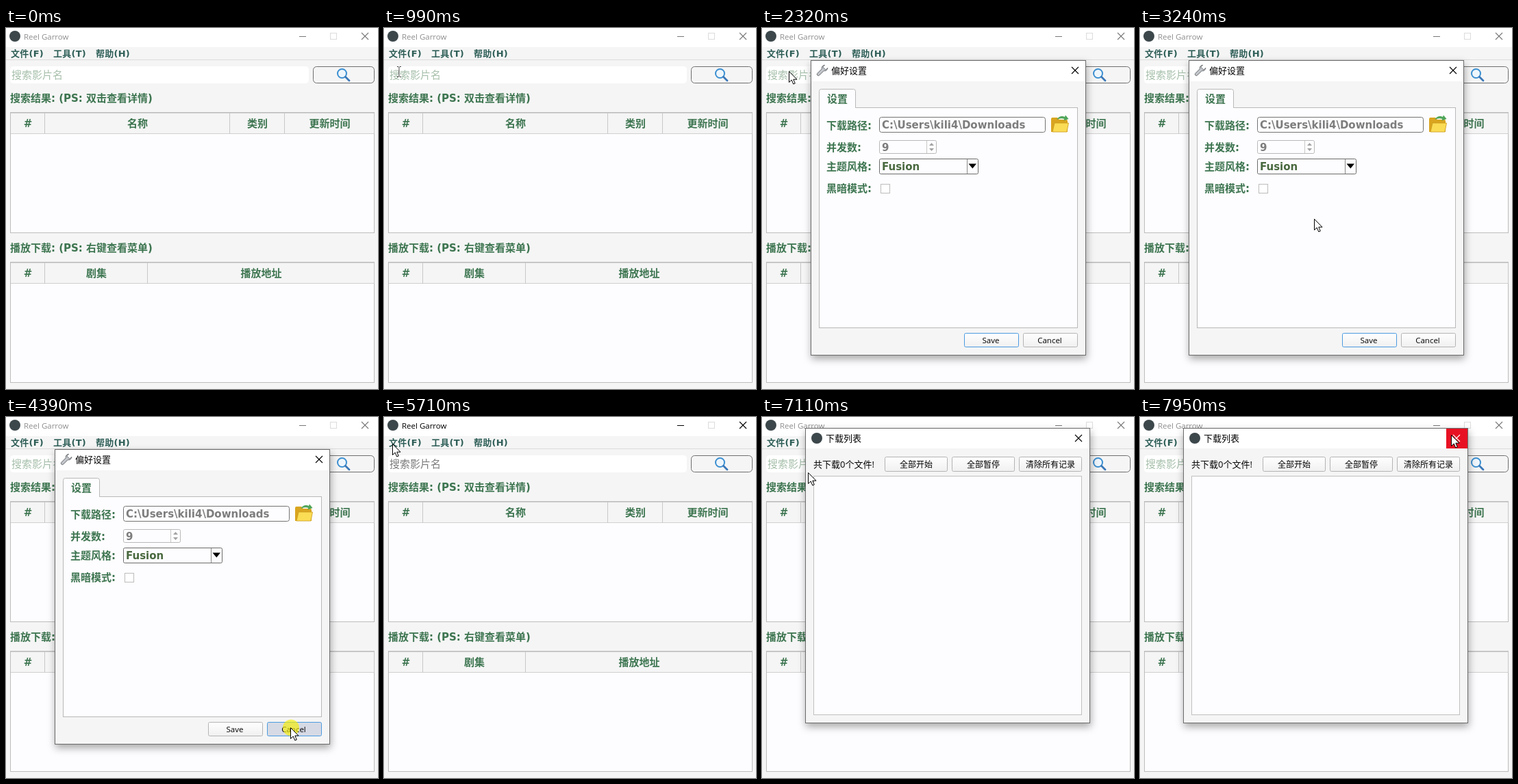
Animation of 543x528 px, one loop 8000 ms. Source, as an HTML page:

```html
<!DOCTYPE html>
<html lang="zh-CN">
<head>
<meta charset="utf-8">
<style>
html, body { margin: 0; width: 100%; height: 100%; overflow: hidden; background: #f5f5f5; }
svg { display: block; width: 543px; height: 528px; }
text { white-space: pre; }
.b { font: bold 15px 'DejaVu Sans', 'Noto Sans CJK SC', 'Noto Sans CJK', sans-serif; fill: #3d7550; }
.m { font-size: 13px; letter-spacing: .25px; fill: #2f5f58; }
.u { font: 12px 'Open Sans', 'Noto Sans CJK SC', 'Noto Sans CJK', sans-serif; fill: #000; }
.p { font-size: 15px; }
.t { font-size: 13px; }
.c { text-anchor: middle; }
</style>
</head>
<body>
<svg id="stage" viewBox="0 0 543 528" xmlns="http://www.w3.org/2000/svg"></svg>
<script>
const PANEL = '#fdfcfe', BG = '#f5f5f5', BLUE = '#2a82da';
const stage = document.getElementById('stage');

// Crisp one pixel outline: x0..x1, y0..y1 are the outer edges
const box = (x0, y0, x1, y1, fill, stroke = 'none', r = 0, extra = '') =>
  `<rect x="${x0 + .5}" y="${y0 + .5}" width="${x1 - x0 - 1}" height="${y1 - y0 - 1}" rx="${r}" fill="${fill}" stroke="${stroke}" ${extra}/>`;
const fill = (x0, y0, x1, y1, color, extra = '') =>
  `<rect x="${x0}" y="${y0}" width="${x1 - x0}" height="${y1 - y0}" fill="${color}" ${extra}/>`;
const text = (x, y, s, cls, extra = '') => `<text x="${x}" y="${y}" class="${cls}" ${extra}>${s}</text>`;
const line = (d, stroke, w = 1, extra = '') => `<path d="${d}" fill="none" stroke="${stroke}" stroke-width="${w}" ${extra}/>`;
const group = (id, body, extra = '') => `<g id="${id}" ${extra}>${body}</g>`;
const cross = (x, y, stroke, extra = '') =>
  line(`M${x - 5} ${y - 5}l10 10m0 -10l-10 10`, stroke, 1.1, extra);
const appIcon = (x, y) => `<circle cx="${x}" cy="${y}" r="8" fill="#3c474b"/>`;

function table(y, cols, labels) {
  let s = box(6, y, 538, y + 177, PANEL, '#bdbdbd') + fill(7, y + 1, 537, y + 32, BG);
  s += line(`M7 ${y + 31.5}H537M7 ${y + 1.5}H537`, '#d0d0d0');
  labels.forEach((label, i) => {
    s += line(`M${cols[i + 1] - .5} ${y + 1}V${y + 32}`, '#c8c8c8');
    s += text((cols[i] + cols[i + 1]) / 2, y + 22, label, 'b c');
  });
  return s;
}

function wrench(x, y) {
  return `<g transform="translate(${x} ${y}) rotate(45)"><path d="M-2 8V-1A4.6 4.6 0 0 1 -3 -8V-4H3V-8A4.6 4.6 0 0 1 2 -1V8A2 2 0 0 1 -2 8Z" fill="#c3c6ca" stroke="#65696e" stroke-width=".9"/></g>`;
}

function filmIcon(x, y) {
  const strip = (dx, dy) => {
    let s = fill(x + dx, y + dy, x + dx + 10, y + dy + 11, '#33383d') + fill(x + dx + 3, y + dy + 1, x + dx + 7, y + dy + 10, '#9ab0bd');
    for (let i = 0; i < 3; i++)
      for (const h of [1, 8]) s += fill(x + dx + h, y + dy + 1 + i * 4, x + dx + h + 1, y + dy + 3 + i * 4, '#eee');
    return s;
  };
  return strip(6, 0) + strip(0, 4);
}

const folderDoc = (x, y) =>
  box(x + 3, y, x + 14, y + 14, '#8d7b60', '#5c5245') + fill(x + 6, y + 2, x + 12, y + 12, '#f3ead2') +
  `<path d="M${x} ${y + 2}l6 2v11l-6 -2z" fill="#e4c98c" stroke="#94774a" stroke-width=".7"/>`;

const folderOpen =
  `<path d="M422 152V133q0 -2 2 -2h7l3 3h10q2 0 2 2v16z" fill="#d9a520"/>
   <path d="M424 152l3 -13h20.500l-2.500 13z" fill="#fbdc55" stroke="#c99a1c" stroke-width=".8"/>
   <path d="M430 134q5 -7 12 -4l1 -2.500l4.500 5.500l-7 2.500l.7 -2.500q-5 -2 -11.200 1z" fill="#4fa55a"/>`;

const button = (x0, y0, x1, y1, label, id = '') =>
  box(x0, y0, x1, y1, 'url(#face)', '#b4b4b4', 2, id && `id="${id}"`) +
  text((x0 + x1) / 2 - (id ? 1 : 0), y1 - 6, label, 'u c', id && 'font-size="11.500" style="font-size:11.500px"');

const windowChrome =
  fill(0, 0, 543, 528, BG) + fill(0, 0, 543, 28, '#fff') + appIcon(13, 12) +
  text(26, 17, 'Reel Garrow', 'u', 'id="title" style="font-size:11.500px"') +
  line('M428 12.500H438', '#000', 1, 'id="min"') + box(473, 7, 483, 17, 'none', '#dcdcdc') +
  cross(524, 12, '#000', 'id="close"') + line('M0 46.500H543', '#dcdcdc') +
  fill(3, 28, 59, 47, BLUE, 'id="fileOn" stroke="#1d62a8"') +
  text(7, 42, '文件(F)', 'b m', 'id="file"') + text(69, 42, '工具(T)', 'b m') + text(131, 42, '帮助(H)', 'b m');

const content =
  box(6, 56, 442, 81, '#fff', '#fff', 4) + text(8, 74, '搜索影片名', 'u p', 'id="hint"') +
  box(448, 56, 538, 81, BG, '#6f6f6f', 5) +
  '<circle cx="490.500" cy="66.500" r="6.500" fill="#eef6fc" stroke="#3b8fd0" stroke-width="2"/>' +
  line('M495.500 71.500L501 77', '#3b78b8', 2.8, 'stroke-linecap="round"') +
  text(6, 108, '搜索结果: (PS: 双击查看详情)', 'b') +
  table(123, [7, 57, 327, 407, 538], ['#', '名称', '类别', '更新时间']) +
  text(6, 327, '播放下载: (PS: 右键查看菜单)', 'b') +
  table(342, [7, 57, 207, 538], ['#', '剧集', '播放地址']);

const menu =
  fill(7, 51, 163, 119, '#000', 'opacity=".45" filter="url(#soft)"') + box(3, 47, 160, 116, PANEL, '#8a8a8a') +
  fill(4, 48, 159, 70, BLUE, 'id="itemOn"') +
  wrench(18, 59) + filmIcon(10, 74) + folderDoc(11, 97) +
  ['设置', '下载列表', '打开文件夹'].map((s, i) => text(31, 64 + i * 23, s, 'u')).join('');

const settings =
  box(71, 47, 473, 479, BG, '#6a6a6a', 0, 'filter="url(#drop)"') + fill(72, 48, 472, 78, '#fff') +
  wrench(88, 62) + text(101, 67, '偏好设置', 'u t') + cross(457, 62, '#000') +
  box(83, 116, 461, 439, PANEL, '#b9b9b9') +
  `<path d="M83.500 117.500V92.500q0 -3 3 -3H133.500q3 0 3 3V116.500" fill="${PANEL}" stroke="#b9b9b9"/>` +
  fill(84, 115, 136, 118, PANEL) + text(95, 109, '设置', 'b') +
  [['下载路径:', 148], ['并发数:', 180], ['主题风格:', 208], ['黑暗模式:', 240]].map(([s, y]) => text(94, y, s, 'b')).join('') +
  box(171, 130, 414, 153, PANEL, '#747474', 3) +
  text(175, 147, 'C:\\Users\\kili4\\Downloads', 'b', 'style="fill:#7d7d7d"') + folderOpen +
  box(171, 164, 255, 184, PANEL, '#b9b9b9', 2) + line('M240.500 165V183', '#c8c8c8') +
  '<path d="M244 172l3.500 -4l3.500 4zM244 176l3.500 4l3.500 -4z" fill="#a2a2a2"/>' +
  text(175, 180, '9', 'b', 'style="fill:#7d7d7d"') +
  box(171, 191, 316, 214, PANEL, '#6c6c6c', 2) + line('M299.500 192V213', '#8a8a8a') +
  '<path d="M301.500 198.500h11.500l-5.700 7z" fill="#000"/>' + text(175, 208, 'Fusion', 'b', 'style="fill:#49693f"') +
  box(173, 228, 187, 242, '#fff', '#bdbdbd') +
  button(295, 446, 375, 467, 'Save', 'save') + button(381, 446, 461, 467, 'Cancel', 'cancel');

const downloads =
  box(63, 16, 479, 448, BG, '#6a6a6a', 0, 'filter="url(#drop)"') + fill(64, 17, 478, 46, '#fff') +
  appIcon(80, 31) + text(93, 36, '下载列表', 'u t') +
  fill(447, 17, 478, 46, '#e81123', 'id="red"') + cross(462, 31, '#000', 'id="closeList"') +
  text(75, 74, '共下载0个文件!', 'u', 'style="font-size:13px"') +
  button(179, 58, 271, 80, '全部开始') + button(277, 58, 369, 80, '全部暂停') + button(375, 58, 467, 80, '清除所有记录') +
  box(75, 86, 467, 436, PANEL, '#c0c0c0');

stage.innerHTML = `<defs>
  <linearGradient id="face" x2="0" y2="1"><stop stop-color="#fff"/><stop offset="1" stop-color="#f0f0f0"/></linearGradient>
  <filter id="drop" x="-10%" y="-10%" width="120%" height="120%"><feDropShadow dx="1" dy="5" stdDeviation="6" flood-opacity=".34"/></filter>
  <filter id="soft" x="-5%" y="-10%" width="110%" height="120%"><feGaussianBlur stdDeviation="1"/></filter></defs>` +
  windowChrome + content + group('menu', menu) + group('settings', settings) + group('downloads', downloads) +
  '<circle id="ring" r="12" fill="#f6ee00" opacity=".65"/>' +
  group('arrow', '<path d="M.5 .5V16.500L4.200 13L6.800 19L9.300 18L6.800 12.200H12Z" fill="#fff" stroke="#000"/>') +
  group('beam', line('M-3 -7.500H-1L0 -6.500L1 -7.500H3M0 -6.500V6.500M-3 7.500H-1L0 6.500L1 7.500H3', '#444'));

const el = {};
stage.querySelectorAll('[id]').forEach(n => el[n.id] = n);
const show = (id, on) => el[id].style.display = on ? '' : 'none';
const paint = (id, attr, value) => el[id].style[attr] = value;

// Pointer way points: time, x, y
const path = [
  [70, 424, 508], [300, 335, 370], [600, 90, 132], [835, 23, 66], [920, 22, 64], [1215, 18, 40],
  [1460, 18, 40], [1690, 33, 54], [1765, 39, 66], [2090, 39, 66], [2400, 39, 62], [2640, 39, 61],
  [2900, 90, 120], [3235, 254, 279], [3465, 402, 376], [3800, 413, 464], [4155, 415, 454],
  [4700, 415, 454], [4850, 395, 425], [5160, 285, 220], [5465, 184, 68], [5690, 12, 39],
  [6080, 12, 39], [6500, 34, 77], [7030, 34, 78], [7250, 170, 92], [7560, 409, 59], [7900, 454, 26]
];
const STEP = 77, LOOP = 8000;

function pointer(t) {
  const i = path.findIndex(p => p[0] > t);
  if (i < 0) return path[path.length - 1].slice(1);
  if (!i) return path[0].slice(1);
  const [a, b] = [path[i - 1], path[i]], k = (t - a[0]) / (b[0] - a[0]);
  return [a[1] + (b[1] - a[1]) * k, a[2] + (b[2] - a[2]) * k];
}

// Window opens with a short fade and a slight growth
function popup(id, t, from, to, cx, cy) {
  const on = t >= from && t < to;
  show(id, on);
  if (!on) return on;
  const k = Math.min(1, .3 + (t - from) / 220), s = .93 + .07 * k;
  el[id].setAttribute('opacity', k);
  el[id].setAttribute('transform', k < 1 ? `translate(${cx * (1 - s)} ${cy * (1 - s)}) scale(${s})` : '');
  return on;
}

function render(t) {
  const within = (a, b) => t >= a && t < b;
  const [x, y] = pointer(Math.floor(t / STEP + .1) * STEP);
  const active = within(1390, 2085) || within(4705, 6795);
  const fileOn = within(1390, 2165) || within(5945, 6870);
  const menuOn = within(1465, 2085) || within(6015, 6795);
  const dialog = [popup('settings', t, 2165, 4705, 272, 263), popup('downloads', t, 6870, LOOP, 271, 232)].some(Boolean);

  paint('title', 'fill', active ? '#000' : '#8f8f8f');
  paint('min', 'stroke', active ? '#000' : '#777');
  paint('close', 'stroke', active ? '#000' : '#777');
  paint('hint', 'fill', active || within(6795, 6870) ? '#7b7b7b' : '#a6bfaa');
  show('fileOn', fileOn);
  paint('file', 'fill', fileOn ? '#000' : '#2f5f58');

  show('menu', menuOn);
  const row = Math.floor((y - 47) / 23);
  show('itemOn', row >= 0 && row < 3);
  el.itemOn.setAttribute('y', 48 + row * 23);

  const pressed = t >= 4385;
  paint('save', 'stroke', pressed ? '#b4b4b4' : '#4b9be0');
  paint('cancel', 'stroke', pressed ? '#4b9be0' : '#b4b4b4');
  paint('cancel', 'fill', pressed ? '#d6dae5' : 'url(#face)');

  const overClose = x > 447 && y < 46;
  show('red', overClose);
  paint('closeList', 'stroke', overClose ? '#fff' : '#000');

  show('ring', within(1390, 1540) || within(1915, 2085) || within(4385, 4705) || within(5935, 6090) || within(6640, 6795));
  el.ring.setAttribute('cx', x + 1);
  el.ring.setAttribute('cy', y + .5);

  const typing = !menuOn && !dialog && x < 442 && y > 55 && y < 82;
  show('arrow', t >= 70 && !typing);
  show('beam', typing);
  const at = `translate(${Math.round(x)} ${Math.round(y)})`;
  el.arrow.setAttribute('transform', at);
  el.beam.setAttribute('transform', at);
}

const start = performance.now();
function tick() {
  render((performance.now() - start) % LOOP);
  requestAnimationFrame(tick);
}
tick();
</script>
</body>
</html>
```
